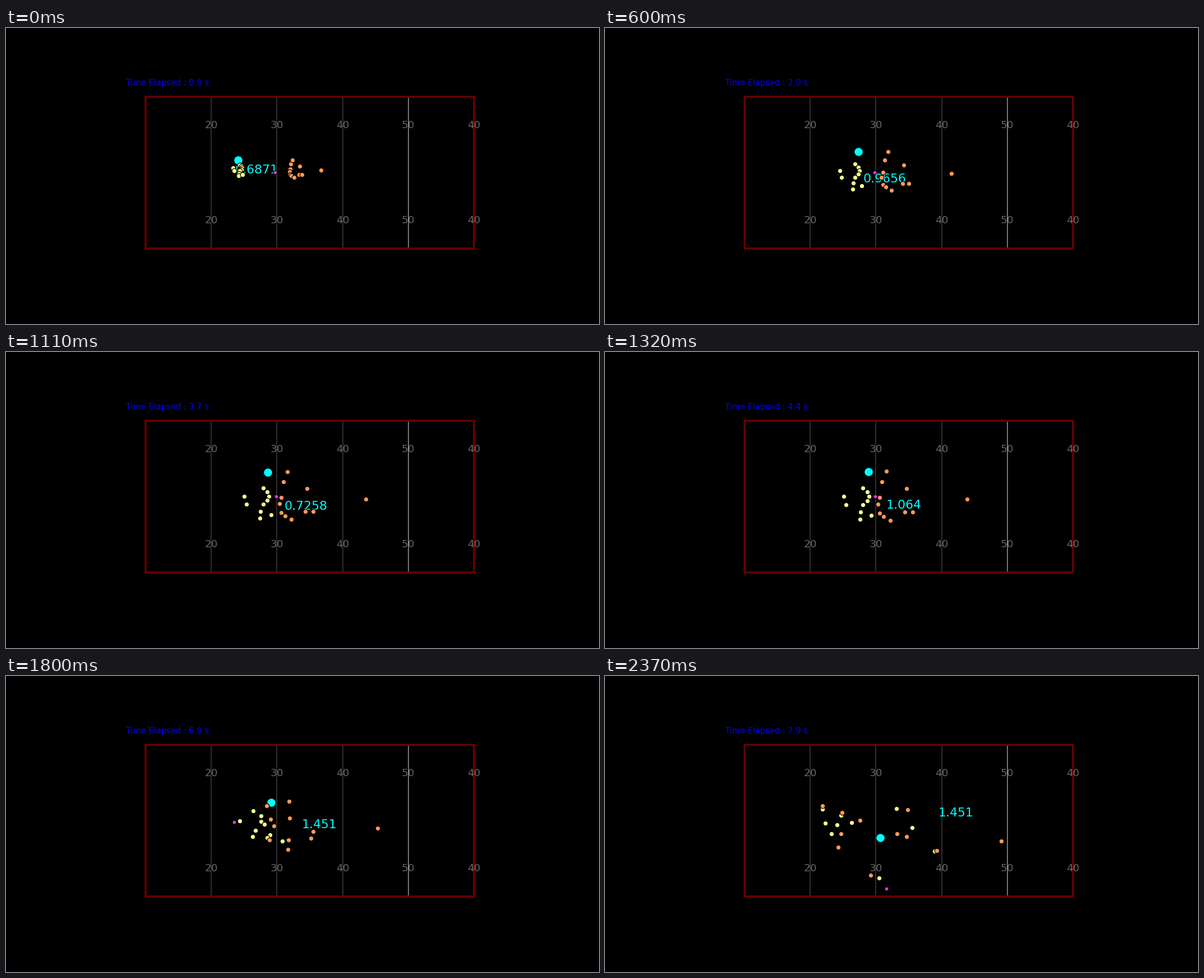
A matplotlib script for the animation above (2.4 s loop, 1058 px wide and 529 px high).

```python
import numpy as np
import matplotlib.pyplot as plt
from matplotlib.animation import FuncAnimation
from matplotlib.patches import Rectangle

W, H, DPI = 1058, 529, 64
PT = 72 / DPI  # points per pixel
FRAMES, INTERVAL = 80, 30
SNAP = 47      # frame at which the ball is snapped
REACT = 3      # frames before the players move after the snap

plt.rcParams["font.family"] = "DejaVu Sans"
fig = plt.figure(figsize=(W / DPI, H / DPI), dpi=DPI, facecolor="black")
ax = fig.add_axes([0, 0, 1, 1])
ax.set(xlim=(0, W), ylim=(H, 0))
ax.axis("off")

frame = np.arange(FRAMES)
settle = 1 - (1 - np.clip(frame / SNAP, 0, 1)) ** 2
after = np.clip((frame - SNAP - REACT) / (FRAMES - 1 - SNAP - REACT), 0, 1)
burst = after ** 2 * (3 - 2 * after)   # quick rush that slows down
chase = after ** 1.7                   # steady speeding up


def huddle(formation, centre, spread=0.35):
    """The formation drawn together around a centre."""
    return np.array(centre) + spread * (formation - formation.mean(axis=0))


def travel(start, stance, end, run):
    """Settle from start into the stance, then run to the end."""
    ready = start + settle[:, None, None] * (stance - start)
    return ready + run[:, :, None] * (end - stance)


def team(rushers, chasers, centre):
    """Rows hold the stance and the final place of each player."""
    rows = np.array(rushers + chasers, float)
    stance, end = rows[:, :2], rows[:, 2:]
    run = np.column_stack([burst] * len(rushers) + [chase] * len(chasers))
    return travel(huddle(stance, centre), stance, end, run)


def dots(paths, color, diameter, zorder, edge=1.22):
    art, = ax.plot([], [], "o", ms=diameter * PT, mfc=color, mec="black",
                   mew=edge * PT, zorder=zorder)
    return art, paths


def label(x, y, text, size, color, **kw):
    return ax.text(x, y, text, fontsize=size * PT, color=color, va="baseline", **kw)


# Field
LEFT, TOP, WIDTH, HEIGHT = 249, 123.4, 586, 270.6
for i, yard in enumerate((20, 30, 40, 50, 40), 1):
    x = LEFT + i * WIDTH / 5
    if i < 5:
        ax.plot([x, x], [TOP, TOP + HEIGHT], color="white", lw=1.83 * PT,
                alpha=0.5 if yard == 50 else 0.2, zorder=1)
    for y in (179, 349):
        label(x, y, str(yard), 18.33, "white", alpha=0.4, ha="center", zorder=3)
ax.add_patch(Rectangle((LEFT, TOP), WIDTH, HEIGHT, fill=False, ec="#660000",
                       lw=3.67 * PT, zorder=2))

# Offense: a curved line of five blockers, the passer, and four runners
line_ends = [(388, 238), (421, 249), (414, 266), (440, 262), (404, 282)]
blockers = [(471 - 2.6 * k * k, 258 + 7.6 * k, *end)
            for k, end in zip(range(-2, 3), line_ends)]
passer = (426, 258, 393, 263)
runners = [(430, 273, 489, 361), (456, 286, 548, 271),
           (455, 299, 520, 237), (475, 292, 588, 313)]
offense = team(blockers + [passer], runners, (416, 254))

rush = [(494, 232, 388, 232), (538, 244, 421, 282), (646, 263, 707, 295),
        (490, 260, 423, 244), (487, 272, 455, 258), (490, 288, 416, 306)]
cover = [(502, 213, 521, 282), (497, 294, 538, 287), (509, 301, 474, 356),
         (535, 286, 592, 312), (549, 286, 540, 239)]
defense = team(rush, cover, (518, 255))

receiver = travel(*np.array([[414, 236], [470, 214], [491, 289]]), chase[:, None])


def polyline(keys, points):
    return np.column_stack([np.interp(frame, keys, c) for c in zip(*points)])


# The ball waits, goes back to the passer, is held briefly, then thrown
ball = polyline([0, SNAP, 62, 64, 79],
                [(480, 258), (482, 258), (395, 261), (396, 261), (502, 380)])
reading = polyline([0, 20, 37, 52, 71, 79],
                   [(408, 260), (461, 276), (496, 282),
                    (507, 278), (557, 264), (595, 251)])
value = np.interp(frame, [0, 20, 37, 52], [0.6871, 0.9656, 0.7258, 1.451])

groups = [
    dots(receiver, "cyan", 14.5, 5, edge=0),
    dots(offense, "#ffff8c", 8.55, 6),
    dots(defense, "#ff9958", 8.55, 7),
    dots(ball[:, None], "#f52cf5", 7, 8),
]
clock = label(214, 103, "", 14.67, "blue", zorder=3)
score = label(0, 0, "", 22, "cyan", zorder=4)


def update(i):
    for art, paths in groups:
        art.set_data(*paths[i].T)
    clock.set_text(f"Time Elapsed : {i / 10:.1f} s")
    score.set_text(f"{value[i]:.4g}")
    score.set_position(reading[i])
    return [art for art, _ in groups] + [clock, score]


anim = FuncAnimation(fig, update, frames=FRAMES, interval=INTERVAL,
                     repeat=True, repeat_delay=0)
plt.show()
```
